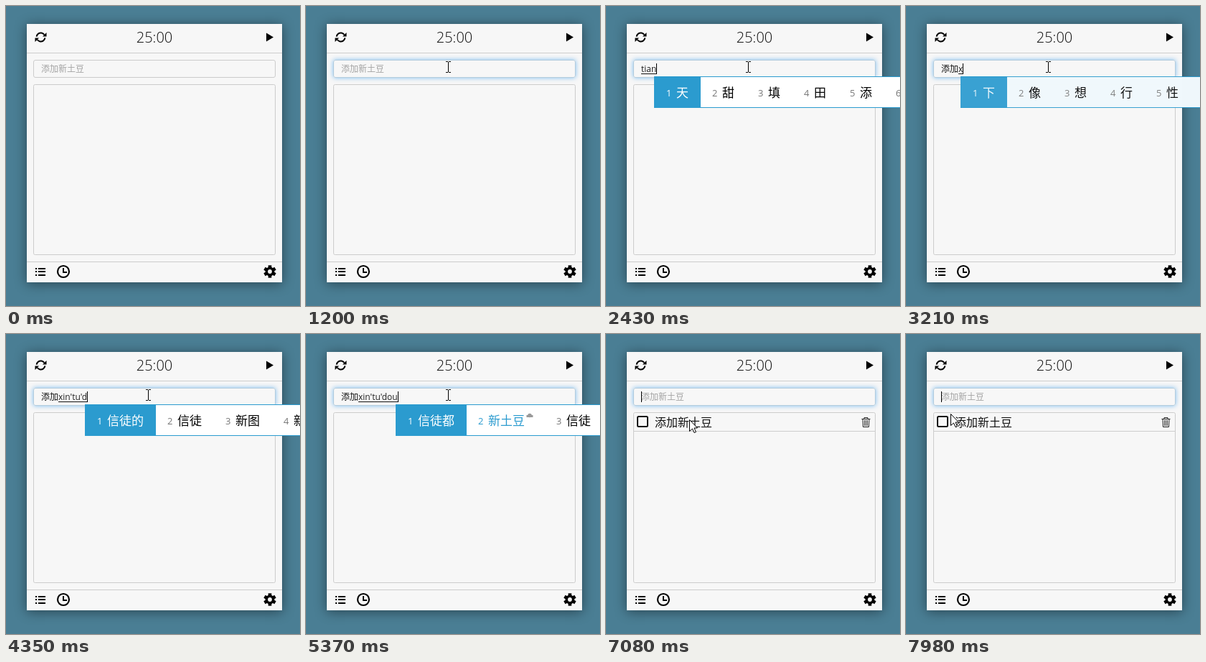
Animation, 410 px wide and 418 px high, one loop 8000 ms. Source, as an HTML page with a canvas:

```html
<!DOCTYPE html>
<html lang="zh-CN">
<head>
<meta charset="utf-8">
<style>
html, body { margin: 0; width: 100%; height: 100%; overflow: hidden; background: #4a7e94; }
canvas { display: block; }
</style>
</head>
<body>
<canvas id="stage" width="410" height="418"></canvas>
<script>
const ctx = document.getElementById('stage').getContext('2d');
const LOOP = 8000;
const LATIN = '"Open Sans", "Noto Sans", sans-serif';
const CJK = '"Noto Sans CJK SC", "Noto Sans CJK", sans-serif';
const PAPER = '#f7f7f7', LINE = '#cccccc', BLUE = '#2b9bcf', TASK = '添加新土豆';
const FOCUS_AT = 690, ENTER_AT = 6150;

// time, committed text, composition, candidates (* marks a cloud result)
const typing = [
  [0, '', '', ''],
  [1530, '', 't', '他 她 天 太 听 图'],
  [1710, '', 'ti', '题 提 体 替 踢 梯'],
  [2220, '', 'tia', '天 条 跳 田 贴 铁'],
  [2400, '', 'tian', '天 甜 填 田 添 舔'],
  [2640, '', "tian'j", '天津 添加 天际 天井 天景'],
  [2790, '', "tian'ji", '天际 天机 天极 天寂'],
  [2850, '', "tian'jia", '添加 天价 天家 田家'],
  [3000, '添加', '', ''],
  [3150, '添加', 'x', '下 像 想 行 性 小'],
  [3330, '添加', 'xi', '系 西 洗 喜 细 戏'],
  [3450, '添加', 'xin', '新 心 信 欣 辛 芯'],
  [3930, '添加', "xin't", '心态 心疼 心痛 新图'],
  [4230, '添加', "xin'tu", '信徒 新图 新 心 信'],
  [4320, '添加', "xin'tu'd", '信徒的 信徒 新图 新'],
  [4980, '添加', "xin'tu'do", '信徒都 信徒 新图 新'],
  [5130, '添加', "xin'tu'dou", '信徒都 信徒 新图 新'],
  [5310, '添加', "xin'tu'dou", '信徒都 新土豆* 信徒 新图'],
  [5880, TASK, '', ''],
  [ENTER_AT, '', '', '']
];
const popupOpens = [1530, 3150];
const caretOff = [[1200, 1530], [4830, 4980], [5670, 5880], [6630, 7075]];

// time, x, y
const pointer = [
  [180, 379, 30], [300, 302, 53], [420, 224, 77], [510, 198, 85], [6960, 198, 85],
  [7080, 116, 119], [7200, 78, 130], [7320, 86, 130], [7440, 180, 127],
  [7590, 325, 116], [7710, 356, 111], [7800, 356, 111],
  [7880, 210, 97], [7980, 62, 111], [LOOP, 62, 111]
];

function text(str, x, y, font, color) {
  ctx.font = font;
  ctx.fillStyle = color;
  ctx.fillText(str, x, y);
  return ctx.measureText(str).width;
}

function rect(x, y, w, h, color) {
  ctx.fillStyle = color;
  ctx.fillRect(x, y, w, h);
}

function poly(points, fill, stroke, width = 1) {
  ctx.beginPath();
  points.forEach(([x, y]) => ctx.lineTo(x, y));
  if (fill) { ctx.closePath(); ctx.fillStyle = fill; ctx.fill(); }
  if (stroke) { ctx.strokeStyle = stroke; ctx.lineWidth = width; ctx.stroke(); }
}

function arc(x, y, r, from, to, width) {
  ctx.beginPath();
  ctx.arc(x, y, r, from, to);
  ctx.strokeStyle = '#000';
  ctx.lineWidth = width;
  ctx.stroke();
}

function disc(x, y, r, color) {
  ctx.beginPath();
  ctx.arc(x, y, r, 0, Math.PI * 2);
  ctx.fillStyle = color;
  ctx.fill();
}

function frame(x, y, w, h, radius, color, width = 1) {
  ctx.beginPath();
  ctx.roundRect(x, y, w, h, radius);
  ctx.strokeStyle = color;
  ctx.lineWidth = width;
  ctx.stroke();
}

function syncIcon(x, y) {
  for (const turn of [0, Math.PI]) {
    ctx.save();
    ctx.translate(x, y);
    ctx.rotate(turn);
    arc(0, 0, 6, -Math.PI * 0.95, -Math.PI * 0.2, 2);
    poly([[8, -6.5], [8, -1], [2.5, -1]], '#000');
    ctx.restore();
  }
}

function gearIcon(x, y) {
  for (let i = 0; i < 6; i++) {
    const a = Math.PI / 6 + i * Math.PI / 3;
    poly([[x, y], [x + 8.7 * Math.cos(a), y + 8.7 * Math.sin(a)]], null, '#000', 4.6);
  }
  disc(x, y, 6.4, '#000');
  disc(x, y, 2.9, PAPER);
}

function trashIcon(x, y) {
  rect(x, y + 2, 12, 1, '#222');
  poly([[x + 3.5, y + 2], [x + 3.5, y + 0.5], [x + 8.5, y + 0.5], [x + 8.5, y + 2]], null, '#222');
  poly([[x + 1.5, y + 3], [x + 2, y + 13.5], [x + 10, y + 13.5], [x + 10.5, y + 3]], null, '#222');
  for (const dx of [4, 6, 8]) rect(x + dx - 0.5, y + 4, 1, 8, '#333');
}

function drawWindow() {
  rect(0, 0, 410, 418, '#4a7e94');
  ctx.save();
  ctx.shadowColor = 'rgba(0,0,0,.45)';
  ctx.shadowBlur = 16;
  ctx.shadowOffsetY = 2;
  rect(29, 25, 356, 360, PAPER);
  ctx.restore();
  rect(29, 65, 356, 1, LINE);
  rect(29, 356, 356, 1, LINE);

  syncIcon(48.5, 43.5);
  ctx.textAlign = 'center';
  text('25:00', 207, 51, `300 20px ${LATIN}`, '#111');
  ctx.textAlign = 'left';
  poly([[363, 37.5], [373, 43.5], [363, 49.5]], '#000');

  for (const y of [365, 369, 374]) {
    rect(41, y, 2, 2, '#000');
    rect(45, y, 10, 2, '#000');
  }
  arc(80, 370, 8, 0, Math.PI * 2, 2.2);
  poly([[80, 365], [80, 371], [85, 371]], null, '#000', 2);
  gearIcon(368, 370);
  frame(38.5, 109.5, 337, 237, 2, LINE);
}

function drawInputBox(focused) {
  if (focused) {
    ctx.save();
    ctx.shadowColor = 'rgba(82,168,236,.75)';
    ctx.shadowBlur = 6;
    ctx.beginPath();
    ctx.roundRect(38, 75, 338, 25, 3);
    ctx.fillStyle = PAPER;
    ctx.fill();
    ctx.restore();
  }
  frame(38.5, 75.5, 337, 24, 2.5, focused ? '#b5cddd' : LINE);
}

function drawTask() {
  rect(39, 135, 336, 1, LINE);
  frame(44, 115, 14, 14, 1.5, '#111', 2);
  text(TASK, 68, 129, `300 16px ${CJK}`, '#111');
  trashIcon(356.5, 116);
}

function drawPopup(left, words, alpha) {
  ctx.save();
  ctx.globalAlpha = alpha;
  rect(left, 98, 410 - left, 44, BLUE);
  rect(left, 99, 410 - left, 42, '#fff');
  let x = left;
  words.split(' ').forEach((entry, i) => {
    const cloud = entry.endsWith('*');
    const word = entry.replace('*', '');
    const width = 47 + 17 * word.length + (cloud ? 11 : 0);
    if (i === 0) rect(x, 98, width + 1, 44, BLUE);
    const color = i === 0 ? '#fff' : cloud ? BLUE : '#000';
    text(i + 1, x + 17, 126, `13px ${LATIN}`, i === 0 ? '#fff' : cloud ? BLUE : '#777');
    text(word, x + 31, 127, `17px ${CJK}`, color);
    if (cloud) {
      const cx = x + 89;
      disc(cx, 113.5, 2.8, '#999');
      rect(cx - 4.5, 113, 9, 3, '#999');
    }
    x += width;
  });
  ctx.restore();
}

function drawInput(t) {
  const focused = t >= FOCUS_AT;
  const [, done, composing, words] = typing.findLast(step => t >= step[0]);
  drawInputBox(focused);
  let x = 49;
  if (!done && !composing) text(TASK, x, 92, `300 12px ${CJK}`, '#a3a3a3');
  if (done) x += text(done, x, 92, `300 12px ${CJK}`, '#111');
  if (composing) {
    const width = text(composing, x, 92, `12px ${LATIN}`, '#222');
    rect(x, 94, Math.round(width), 1, '#111');
    x += width;
  }
  x = Math.round(x);
  const hidden = caretOff.some(([from, to]) => t >= from && t < to);
  if (focused && !hidden) rect(x, 80, 1, 15, '#000');
  if (words) {
    const age = t - popupOpens.findLast(open => t >= open);
    const p = Math.min(1, (age + 20) / 140);
    drawPopup(x - 3, words, 1 - (1 - p) ** 3);
  }
}

function drawPointer(t) {
  const i = pointer.findIndex(key => t < key[0]);
  if (i < 1) return;
  const [t0, x0, y0] = pointer[i - 1], [t1, x1, y1] = pointer[i];
  const p = (t - t0) / (t1 - t0);
  const x = Math.round(x0 + (x1 - x0) * p), y = Math.round(y0 + (y1 - y0) * p);
  if (x > 38 && x < 376 && y > 75 && y < 100) {
    rect(x, y - 7, 1, 14, '#000');
    for (const sy of [y - 8, y + 7]) {
      rect(x - 3, sy, 3, 1, '#000');
      rect(x + 1, sy, 3, 1, '#000');
    }
    return;
  }
  const shape = [[0, 0], [0, 16], [4, 12.5], [6.5, 18], [9, 17], [6.5, 11.5], [11, 11.5], [0, 0]];
  poly(shape.map(([dx, dy]) => [x + dx + 0.5, y + dy + 0.5]), '#fff', '#000');
}

function render(now) {
  const t = now % LOOP;
  drawWindow();
  if (t >= ENTER_AT) drawTask();
  drawInput(t);
  drawPointer(t);
  requestAnimationFrame(() => render(performance.now()));
}
render(0);
</script>
</body>
</html>
```
